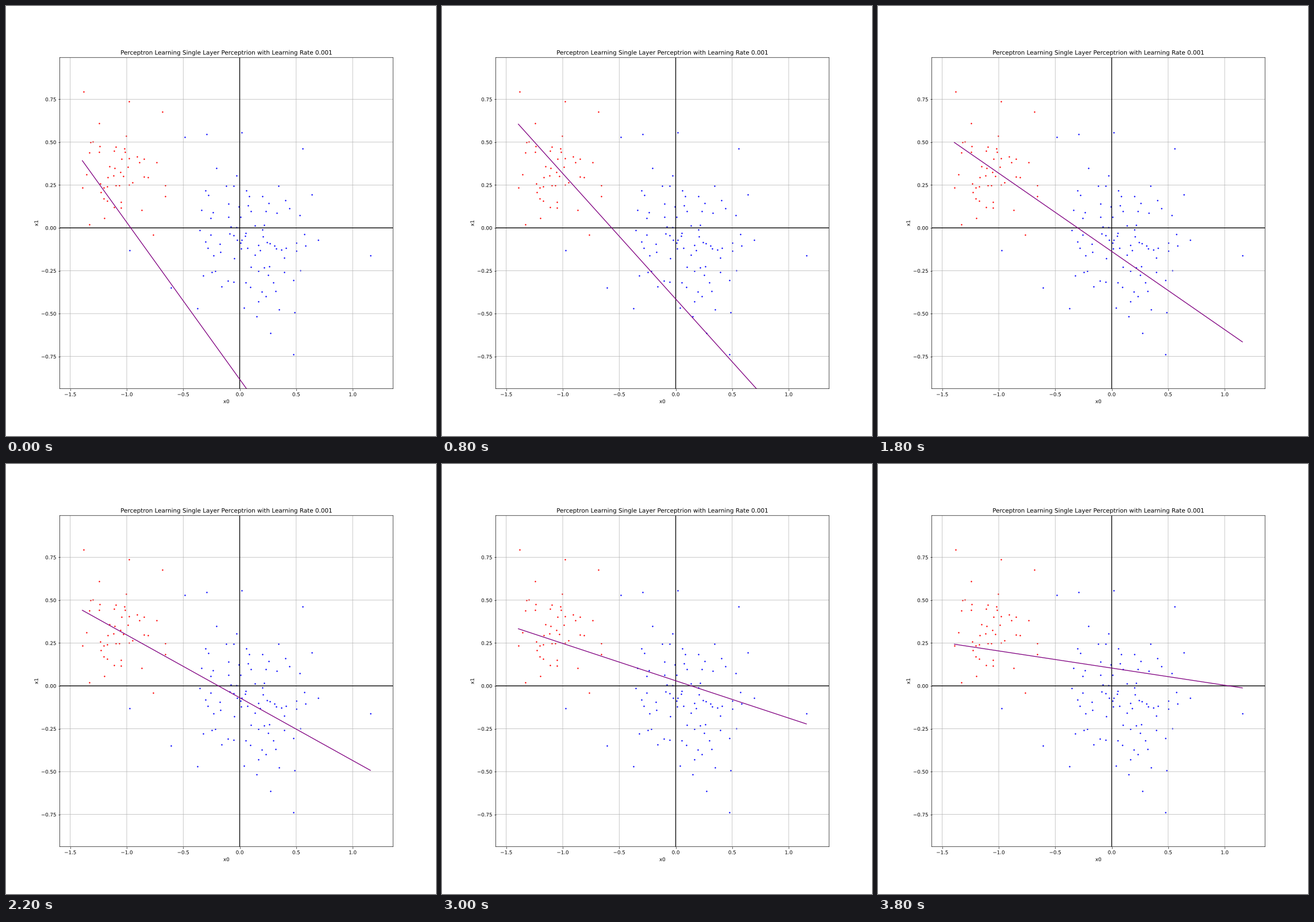
A matplotlib script for the animation above (4000 ms loop, 748x748 px).

```python
import numpy as np
import matplotlib.pyplot as plt
from matplotlib.animation import FuncAnimation
from matplotlib.patheffects import Normal
from matplotlib.text import Text

SIZE = 748
FRAMES, INTERVAL = 20, 200
MARGIN = 0.2

plt.rcParams.update({
    "font.family": "DejaVu Sans",
    "text.hinting": "none",
    "path.snap": False,
})


def cloud(rng, n, mean, spread, low, high, gap=0.018):
    """Normal samples kept inside a box and clear of each other."""
    points = []
    while len(points) < n:
        p = rng.normal(mean, spread)
        inside = np.all(p >= low) and np.all(p <= high)
        if inside and all(np.hypot(*(p - q)) > gap for q in points):
            points.append(p)
    return points


def glide(t, times, values):
    """Smooth cubic curve through a few key values."""
    slopes = np.gradient(values, times, axis=0, edge_order=2)
    i = min(np.searchsorted(times, t, side="right") - 1, len(times) - 2)
    h = times[i + 1] - times[i]
    u = (t - times[i]) / h
    ease = u * u * (3 - 2 * u)
    return (values[i] + ease * (values[i + 1] - values[i])
            + h * u * (1 - u) * ((1 - u) * slopes[i] - u * slopes[i + 1]))


# Two classes: a few outliers around a random cloud each.
rng = np.random.default_rng(4)
red = np.array([(-1.393, 0.235), (-1.384, 0.793), (-0.978, 0.738),
                (-0.684, 0.677), (-1.245, 0.610)]
               + cloud(rng, 45, (-1.05, 0.27), (0.19, 0.17),
                       (-1.36, -0.085), (-0.63, 0.58)))
blue = np.array([(1.157, -0.160), (0.475, -0.738), (0.270, -0.614),
                 (-0.975, -0.132), (-0.607, -0.348), (0.695, -0.070),
                 (0.640, 0.193), (-0.484, 0.528), (-0.295, 0.546),
                 (0.020, 0.558)]
                + cloud(rng, 89, (0.02, -0.09), (0.29, 0.25),
                        (-0.59, -0.535), (0.64, 0.465)))

# Key epochs and the line's height at its left and right end.
EPOCHS = np.array([0, 2, 4, 6, 9, 12, 15, 19])
HEIGHTS = np.array([(0.392, -1.942), (0.551, -1.592), (0.605, -1.262),
                    (0.585, -0.992), (0.498, -0.665), (0.413, -0.417),
                    (0.333, -0.222), (0.243, -0.012)])

samples = np.vstack([red, blue])
low, high = samples.min(axis=0), samples.max(axis=0)

fig, ax = plt.subplots(figsize=(12, 12), dpi=SIZE / 12)
ax.set_xlim(low[0] - MARGIN, high[0] + MARGIN)
ax.set_ylim(low[1] - MARGIN, high[1] + MARGIN)
ax.set(xlabel="x0", ylabel="x1")
ax.set_title("Perceptron Learning Single Layer Perceptrion with Learning Rate 0.001")
ax.grid(True)
ax.axhline(0, color="black")
ax.axvline(0, color="black")
ax.scatter(*red.T, s=3, color="red")
ax.scatter(*blue.T, s=3, color="blue")
line, = ax.plot([low[0], high[0]], HEIGHTS[0], color="purple")

# Outlined glyphs keep their spacing at this low resolution.
for text in fig.findobj(Text):
    text.set_path_effects([Normal()])


def update(epoch):
    line.set_ydata(glide(epoch, EPOCHS, HEIGHTS))
    return line,


anim = FuncAnimation(fig, update, frames=FRAMES, interval=INTERVAL,
                     repeat=True, repeat_delay=0)
plt.show()
```
